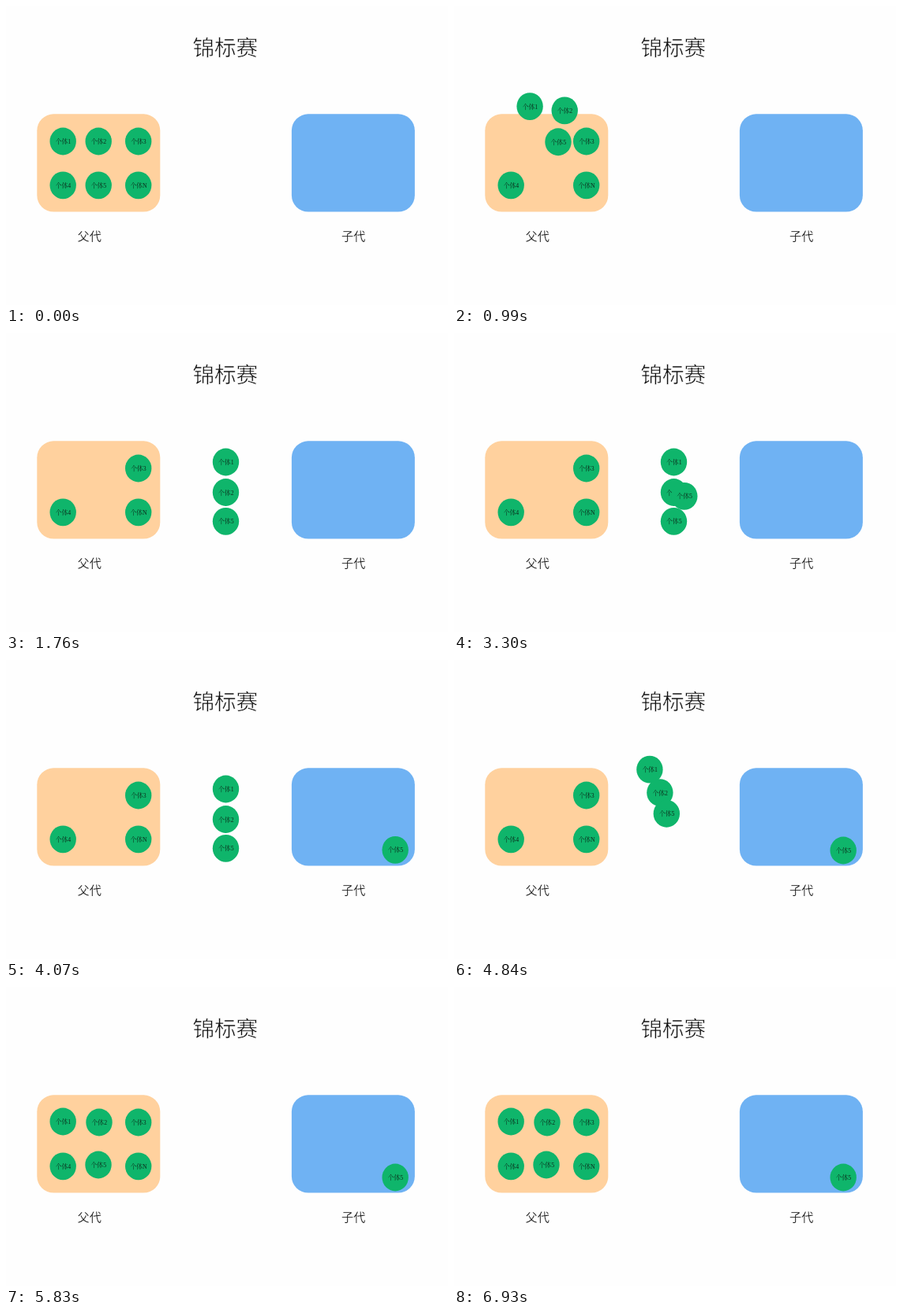
These frames come from a looping animation (560x380 px, 7590 ms). An HTML page:

```html
<!DOCTYPE html>
<html lang="zh-CN">
<head>
<meta charset="utf-8">
<style>
  html, body { margin: 0; width: 100%; height: 100%; overflow: hidden; background: #fefefe; }
  svg { display: block; }
  text { text-anchor: middle; fill: #111; font-family: "Noto Sans CJK SC", sans-serif; font-weight: 300; }
  /* A background-coloured stroke thins the glyphs. */
  .title { font-size: 27.6px; stroke: #fefefe; stroke-width: 0.6px; }
  .label { font-size: 15.2px; stroke: #fefefe; stroke-width: 0.25px; }
  .node ellipse { fill: #0fb56b; }
  .node text { font: 7.8px "Liberation Serif", "Noto Serif CJK SC", "Noto Sans CJK SC", serif; fill: #0c2b1b; }
</style>
</head>
<body>
<svg width="560" height="380" viewBox="0 0 560 380">
  <text class="title" x="277.8" y="63.4">锦标赛</text>
  <rect x="39.3" y="137.3" width="156" height="124.3" rx="21" fill="#ffd19e"/>
  <rect x="361.9" y="137.3" width="156" height="124.3" rx="21" fill="#6fb2f3"/>
  <text class="label" x="105.7" y="298.3">父代</text>
  <text class="label" x="440.2" y="298.3">子代</text>
  <g id="nodes"></g>
</svg>
<script>
const LOOP = 7590, STEP = 110;
const NS = "http://www.w3.org/2000/svg";
const layer = document.getElementById("nodes");

function make(tag, attrs, parent) {
  const el = document.createElementNS(NS, tag);
  for (const key in attrs) el.setAttribute(key, attrs[key]);
  if (parent) parent.append(el);
  return el;
}

// Half ellipse between two points; (ax, ay) leads from the chord's middle to the apex.
function arc([x0, y0], [x1, y1], [ax, ay]) {
  const k = 0.5523, hx = (x1 - x0) / 2, hy = (y1 - y0) / 2;
  const px = x0 + hx + ax, py = y0 + hy + ay;
  return make("path", { d: `M${x0} ${y0}
    C${x0 + k * ax} ${y0 + k * ay} ${px - k * hx} ${py - k * hy} ${px} ${py}
    C${px + k * hx} ${py + k * hy} ${x1 + k * ax} ${y1 + k * ay} ${x1} ${y1}` });
}

function move(start, duration, from, to, apex) {
  const path = arc(from, to, apex);
  return { start, duration, path, length: path.getTotalLength() };
}

function ease(t) {
  t = Math.min(1, Math.max(0, t));
  return t < 0.5 ? 2 * t * t : 1 - 2 * (1 - t) ** 2;
}

function node(name, home, moves = [], from = 0) {
  const group = make("g", { class: "node" }, layer);
  make("ellipse", { rx: 16.7, ry: 17.4 }, group);
  make("text", { x: 0.3, y: 3 }, group).textContent = "个体" + name;
  return { group, home, moves, from };
}

const out = (from, to, apex) => move(650, 1105, from, to, apex);
const back = (from, to, apex) => move(4510, 1100, from, to, apex);

function traveller(name, home, centre, end, apexOut, apexBack) {
  return node(name, home, [out(home, centre, apexOut), back(centre, end, apexBack)]);
}

const nodes = [
  node("3", [167.7, 172]),
  node("4", [72.2, 227.8]),
  node("N", [167.7, 227.8]),
  traveller("1", [72.2, 172], [278.5, 164], [72.2, 171], [2.2, -69.8], [0, -36.4]),
  traveller("2", [117.2, 172], [278.5, 202.5], [118, 172], [13.6, -72], [-6, -55]),
  traveller("5", [117.2, 227.8], [278.5, 239.3], [117, 226], [7.5, -110.7], [6.5, -80]),
  node("5", [278.5, 239.3], [move(3028, 1080, [278.5, 239.3], [493.2, 242], [1, -67.6])], 3028),
];

function draw(time) {
  for (const { group, home, moves, from } of nodes) {
    let [x, y] = home;
    for (const m of moves) {
      if (time < m.start) break;
      ({ x, y } = m.path.getPointAtLength(m.length * ease((time - m.start) / m.duration)));
    }
    group.setAttribute("transform", `translate(${x} ${y})`);
    group.setAttribute("visibility", time < from ? "hidden" : "visible");
  }
}

const begin = performance.now();
function tick() {
  const time = (performance.now() - begin) % LOOP;
  draw(Math.floor(time / STEP) * STEP);
  requestAnimationFrame(tick);
}
tick();
</script>
</body>
</html>
```
